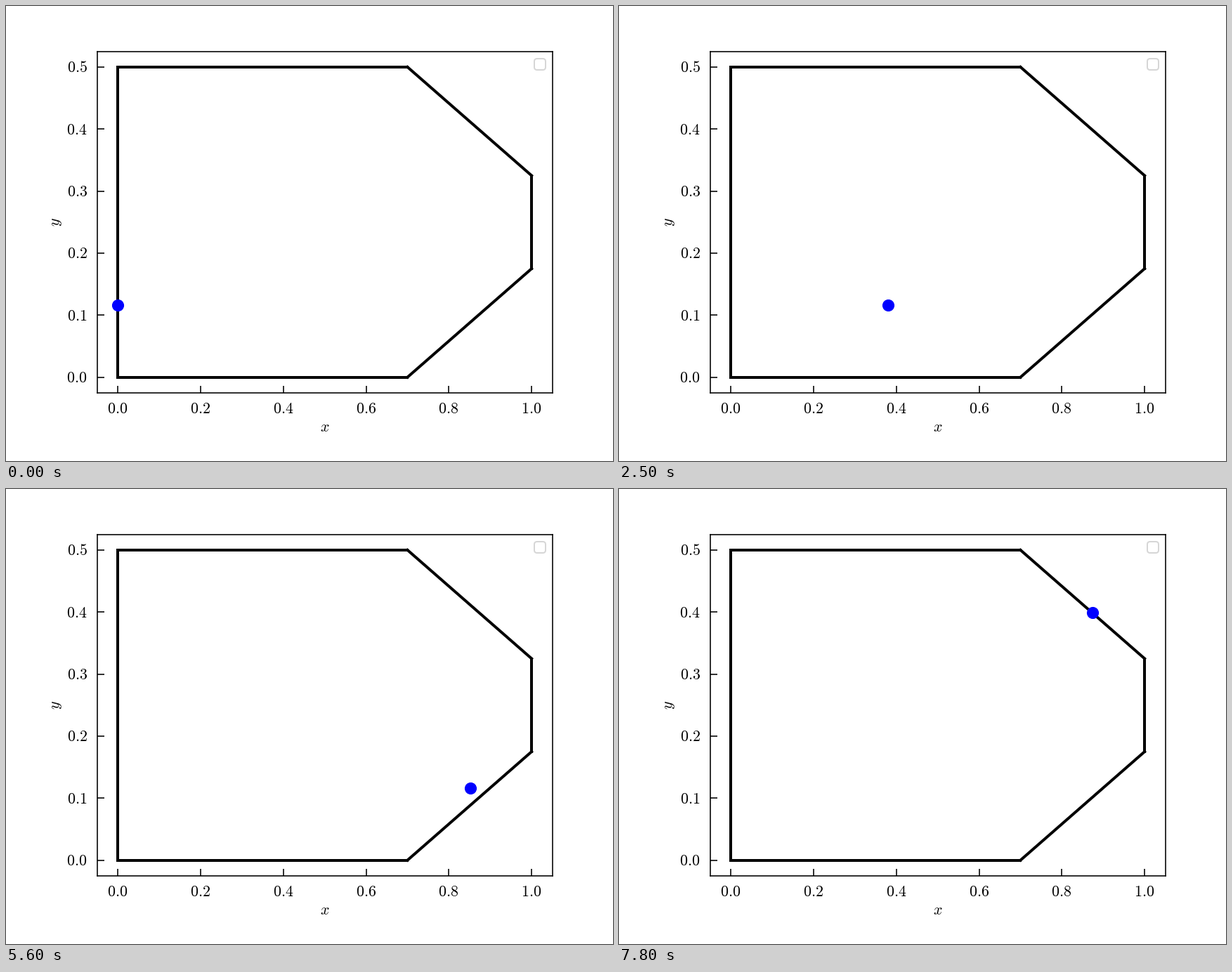
Animation of 864x648 px, one loop 8000 ms. Source, as a matplotlib script:

```python
import numpy as np
import matplotlib.pyplot as plt
from matplotlib.animation import FuncAnimation

W, H, DPI = 864, 648, 144
plt.rcParams["mathtext.fontset"] = "cm"

fig = plt.figure(figsize=(W / DPI, H / DPI), dpi=DPI, facecolor="white")
ax = fig.add_axes([0.15, 0.15, 0.75, 0.75])
ax.set_xlim(-0.05, 1.05)
ax.set_ylim(-0.025, 0.525)

xticks = np.arange(6) * 0.2
yticks = np.arange(6) * 0.1
ax.set_xticks(xticks)
ax.set_yticks(yticks)
ax.tick_params(direction="in", length=5, width=0.8,
               labelbottom=False, labelleft=False)


def label(x, y, s, **kw):
    """Math text with its baseline at pixel (x, y), y pointing down."""
    fig.text(x / W, 1 - y / H, f"${s}$", fontsize=11, va="baseline", **kw)


def to_px(x, y):
    px, py = ax.transData.transform((x, y))
    return px, H - py


for v in xticks:
    label(to_px(v, 0)[0] - 0.3, 580, f"{v:.1f}", ha="center")
for v in yticks:
    label(115.6, to_px(0, v)[1] + 7.4, f"{v:.1f}", ha="right")
label(453.6, 605.8, "x", ha="center")
fig.text(76.5 / W, 1 - 308 / H, "$y$", fontsize=11, rotation=90,
         rotation_mode="anchor", ha="center", va="baseline")

# Room outline, one segment per wall
corners = [(0, 0), (0.7, 0), (1, 0.175), (1, 0.325), (0.7, 0.5), (0, 0.5)]
for (x0, y0), (x1, y1) in zip(corners, corners[1:] + corners[:1]):
    ax.plot([x0, x1], [y0, y1], color="black", lw=2)

ax.legend(handles=[], labels=[], loc="upper right", fontsize=10)

# Straight flights between wall hits; each hit point is held one extra step
start_y, hit_x = 0.1157, 0.8733
hits = [(0, start_y),
        (0.7 + 0.3 * start_y / 0.175, start_y),
        (hit_x, 0.5 - 0.175 * (hit_x - 0.7) / 0.3)]
path = np.vstack([np.linspace(hits[0], hits[1], 60),
                  np.linspace(hits[1], hits[2], 19),
                  hits[2:]])

ball = ax.scatter(*path[0], s=50, color="blue", linewidths=1.5, zorder=3)


def update(i):
    ball.set_offsets(path[i])
    return (ball,)


anim = FuncAnimation(fig, update, frames=len(path), interval=100,
                     repeat=True, repeat_delay=0)
plt.show()
```
